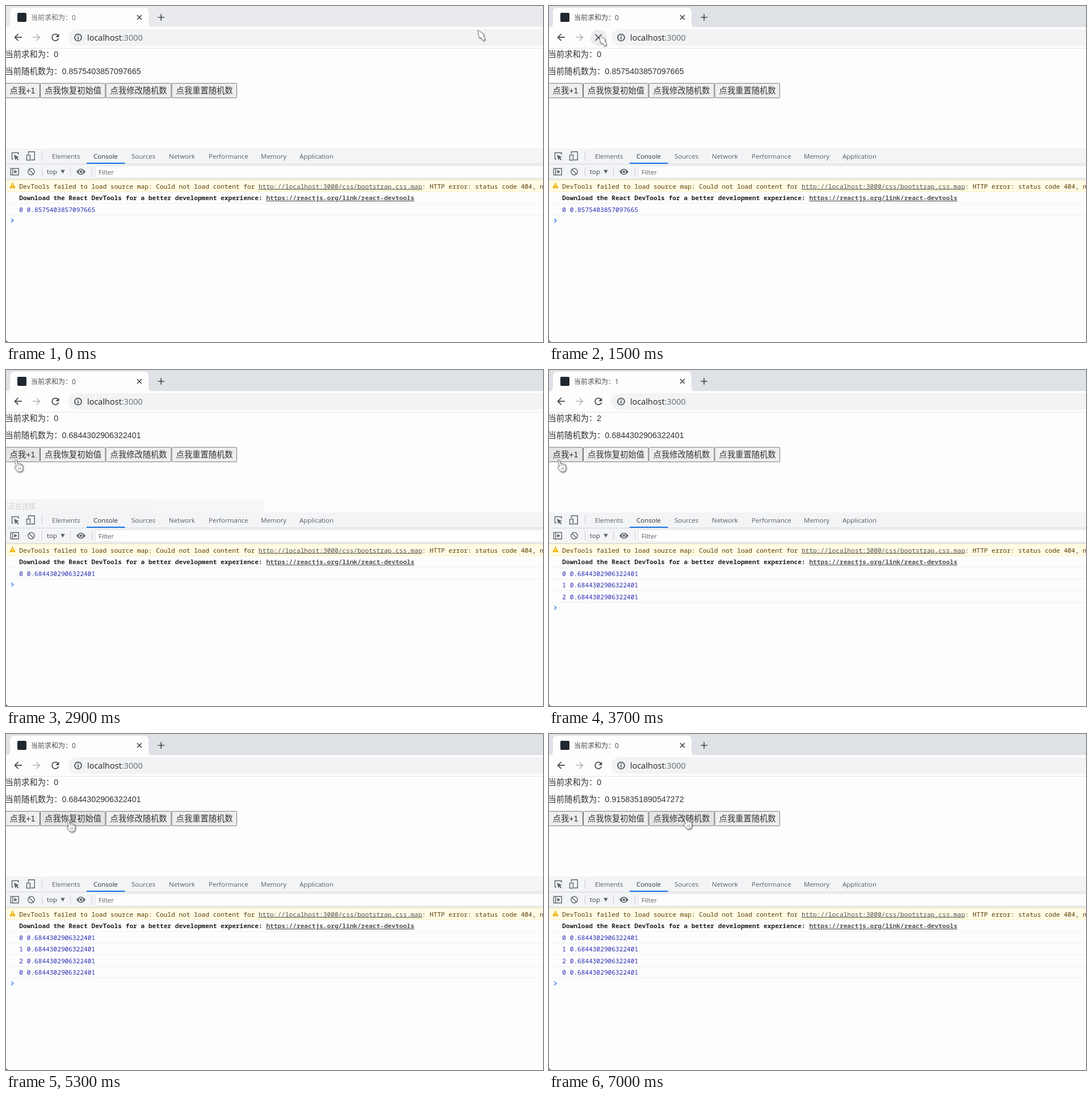
Recreate the animation shown at these times as an HTML page. Size 946x592 px, loop 8 s.

```html
<!DOCTYPE html>
<html lang="zh-CN">
<head>
<meta charset="utf-8">
<title>Counter demo</title>
<style>
  html, body { margin: 0; width: 100%; height: 100%; overflow: hidden; background: #fdfdfd; }
  svg { display: block; width: 100vw; height: 100vh; }
  text { white-space: pre; }
  .page { font: 14.3px "Liberation Sans", "Noto Sans CJK SC", "Noto Sans CJK", sans-serif; fill: #333; }
  .ui { font: 11.5px "Open Sans", "Noto Sans CJK SC", "Noto Sans CJK", sans-serif; fill: #5a5e62; }
  .small { font-size: 12px; }
  .mono { font: 11.16px "Noto Sans Mono", "DejaVu Sans Mono", monospace; }
  .link { text-decoration: underline; fill: #545454; }
  .line { fill: none; stroke: #5f6368; stroke-width: 1.4; }
  .dark { fill: none; stroke: #45494d; stroke-width: 1.7; }
  .rule { stroke: #f0f0f0; }
</style>
</head>
<body>
<svg viewBox="0 0 946 592" xmlns="http://www.w3.org/2000/svg">
  <defs>
    <filter id="shadow" x="-50%" y="-50%" width="220%" height="220%">
      <feDropShadow dx="1" dy="1.5" stdDeviation="1.1" flood-color="#000" flood-opacity=".45"/>
    </filter>
  </defs>
  <rect width="946" height="592" fill="#fdfdfd"/>

  <!-- tab strip -->
  <rect id="strip" width="946" height="38"/>
  <path d="M0 38Q7 38 7 30V11Q7 3 15 3H243Q251 3 251 11V30Q251 38 259 38Z" fill="#fdfdfd"/>
  <rect id="icon" x="20" y="12" width="16" height="16" rx="2" fill="#20282f"/>
  <g id="busy">
    <circle cx="28" cy="20" r="5" fill="#20282f"/>
    <path id="spin" d="M28 27A7 7 0 0 0 34 23.5" fill="none" stroke="#2f7de1" stroke-width="1.6"/>
  </g>
  <text id="title" class="ui small" x="44" y="24.6"></text>
  <path class="dark" d="M231 16L239 24M239 16L231 24"/>
  <path class="dark" d="M267.5 20H279M273.2 14.2V25.8"/>

  <!-- toolbar -->
  <rect y="37" width="946" height="37" fill="#fdfdfd"/>
  <path d="M0 74.5H946" stroke="#e0e2e4"/>
  <path d="M946 41H124A14.5 14.5 0 0 0 124 70H946Z" fill="#f1f3f4"/>
  <path class="dark" d="M28 55.2H15.5M21.5 49.2L15.5 55.2L21.5 61.2"/>
  <path class="dark" style="stroke:#b9bbbe" d="M47 55.2H59.5M53.5 49.2L59.5 55.2L53.5 61.2"/>
  <circle id="halo" cx="87.3" cy="56" r="14.5" fill="#ececee"/>
  <g id="reload">
    <path class="dark" d="M91.7 52A5.8 5.8 0 1 0 92.5 57"/>
    <path d="M93.4 49V55H87.4Z" fill="#45494d"/>
  </g>
  <path id="stop" class="dark" d="M81.5 50L92.5 61M92.5 50L81.5 61"/>
  <circle class="dark" cx="127" cy="55.5" r="6"/>
  <path class="dark" d="M127 54.7V59M127 51.8V53.4"/>
  <text class="ui" x="143" y="60.8" style="font-size:14.5px;fill:#202124">localhost<tspan fill="#686c70">:3000</tspan></text>

  <!-- page -->
  <text id="sum" class="page" x="-1.5" y="89.6"></text>
  <text id="rand" class="page" x="-1.5" y="120.4"></text>
  <g id="buttons"></g>
  <g id="status">
    <path d="M0 227.5H452Q455.5 227.5 455.5 231V251H0Z" fill="#dee1e6"/>
    <text class="ui small" x="4" y="244.5" style="fill:#44484c">正在连接...</text>
  </g>

  <!-- developer tools -->
  <rect y="251" width="946" height="55" fill="#f2f4f6"/>
  <path d="M0 278.5H946M0 305.5H946" stroke="#d3d6da"/>
  <g id="tabs"></g>
  <rect x="142" y="276" width="67.5" height="2" fill="#1a73e8"/>
  <path d="M63.5 256V272M63.5 284V300M113.5 284V300M151.5 284V300" stroke="#cccfd3"/>
  <path class="line" d="M13 269.5H10.5V258.5H22V262"/>
  <path d="M14 262L23 266.2L19.3 267.4L22.4 270.6L21 272L17.9 268.8L16.5 272Z" fill="#5f6368"/>
  <path class="line" d="M39.5 261V256.8H50.3V271.2H44"/>
  <rect class="line" x="36.5" y="262.6" width="6" height="9"/>
  <rect class="line" x="8.3" y="286.3" width="14" height="11.4"/>
  <path class="line" d="M11.7 286V298"/>
  <path d="M14.5 288.8L20 292L14.5 295.2Z" fill="#5f6368"/>
  <circle class="line" cx="44.5" cy="292" r="5.7"/>
  <path class="line" d="M40.5 288L48.5 296"/>
  <text class="ui" x="72" y="296.4" style="fill:#404448">top</text>
  <path d="M96.3 288.8H103.7L100 295.2Z" fill="#5f6368"/>
  <path d="M124 292Q132 281.5 140 292Q132 302.5 124 292Z" fill="#5f6368"/>
  <circle cx="132" cy="292" r="2.9" fill="#5f6368" stroke="#f2f4f6" stroke-width="1.5"/>
  <rect x="157.5" y="281.5" width="800" height="21" fill="#fdfdfd" stroke="#dfe1e4"/>
  <text class="ui" x="163" y="296.8">Filter</text>

  <!-- console -->
  <rect y="306" width="946" height="21" fill="#fffbe5"/>
  <path d="M0 306.5H946M0 327.3H946" stroke="#fbefba"/>
  <path d="M11.5 311.5L16.2 320.5H6.8Z" fill="#f0b400" stroke="#f0b400" stroke-linejoin="round"/>
  <path d="M11.5 314V317.4M11.5 318.4V319.7" stroke="#fff" stroke-width="1.3"/>
  <text class="mono" x="23.3" y="321.6" fill="#5c3c00">DevTools failed to load source map: Could not load content for <tspan class="link">http://localhost:3000/css/bootstrap.css.map</tspan>: HTTP error: status code 404, ne</text>
  <g id="logs"></g>
  <g id="prompt">
    <path d="M9.4 -3.2L12.8 0L9.4 3.2" fill="none" stroke="#367cf1" stroke-width="1.5"/>
    <path id="caret" d="M24.5 -7V7.5" stroke="#222" stroke-width="1.2"/>
  </g>
  <path d="M0 587Q.6 591.4 5 592H0Z" fill="#777"/>

  <!-- pointer -->
  <g id="pointer" filter="url(#shadow)" fill="#fafafa" stroke="#777" stroke-linejoin="round">
    <path id="arrow" d="M0 0L11 7L10 10.5L13.2 15.5L9.6 18.6L6.3 13.6L2.2 12.8Z"/>
    <g id="hand">
      <path d="M.6 2Q1 -.5 3.2 .8L6 7.6Q8 6 9.4 7.4Q11 6.2 12.2 8Q14 7.6 14.4 10L15 15Q15 20 11 21Q6 22 3.5 18.5L.2 13.5Q0 11.4 2.4 12.2L3.6 12.6Z"/>
      <path fill="none" stroke-width=".9" d="M6 7.6L7.2 11M9.4 7.6L10.2 11M12.2 8.2L12.8 11M7 14L8 18M10 13.6L10.6 17.6"/>
    </g>
  </g>
</svg>
<script>
const LOOP = 8000, ROW = 20.5;
const $ = id => document.getElementById(id);
const show = (id, on) => $(id).style.display = on ? '' : 'none';
const within = (t, a, b) => t >= a && t < b;

// Latest value whose time has come, from [time, value] pairs.
const at = (list, t) => list.filter(e => e[0] <= t).pop()[1];

const sums = [[0, 0], [3300, 1], [3600, 2], [4700, 0]];
const titles = [[0, 0], [3500, 1], [3900, 2], [4800, 0]];
const rands = [[0, '0.8575403857097665'], [2400, '0.6844302906322401'], [7000, '0.9158351890547272']];

// Pointer stops: time, x, y
const stops = [
  [0, 831, 42.5], [900, 88.5, 52], [2500, 88.5, 52], [2700, 70, 60], [2900, 15, 158],
  [3900, 15, 158], [4300, 105, 150], [5000, 105, 150], [5100, 107, 151],
  [6400, 107, 151], [6800, 237, 146]
];

const buttons = [
  { label: '点我+1', x: -1, w: 60.5, presses: [[3200, 3300], [3500, 3600]] },
  { label: '点我恢复初始值', x: 60.5, w: 114.5, presses: [[4600, 4700], [5200, 5300], [5500, 5600], [5900, 6300]] },
  { label: '点我修改随机数', x: 176, w: 115, presses: [[6900, 7000]] },
  { label: '点我重置随机数', x: 292, w: 114.5, presses: [] }
];

$('buttons').innerHTML = buttons.map(b =>
  `<rect x="${b.x}" y="136.2" width="${b.w}" height="25.6" rx="1.5" stroke="#767676"/>
   <text class="page" x="${b.x + 7.6}" y="153.6">${b.label}</text>`).join('');
const faces = $('buttons').querySelectorAll('rect');

$('tabs').innerHTML = [['Elements', 81], ['Console', 154], ['Sources', 221], ['Network', 287],
  ['Performance', 357], ['Memory', 449], ['Application', 517]].map(([name, x]) =>
  `<text class="ui" x="${x}" y="268.8"${name === 'Console' ? ' style="fill:#2c3034"' : ''}>${name}</text>`).join('');

const hint = '<tspan font-weight="700" fill="#222">Download the React DevTools for a better development experience: ' +
  '<tspan class="link">https://reactjs.org/link/react-devtools</tspan></tspan>';

function consoleRows(t) {
  if (within(t, 2000, 2400)) return [];
  const rand = at(rands, Math.min(t, 6900));
  return [hint, ...sums.filter(e => e[0] <= t).map(e => `${e[1]} ${rand}`)];
}

function pointerAt(t) {
  const i = stops.findIndex(s => s[0] > t);
  if (i < 0) return stops[stops.length - 1].slice(1);
  const [a, b] = [stops[i - 1], stops[i]];
  const p = (t - a[0]) / (b[0] - a[0]), e = p * p * (3 - 2 * p);
  return [a[1] + (b[1] - a[1]) * e, a[2] + (b[2] - a[2]) * e];
}

let lastRows = '';
function draw(t) {
  const active = t >= 1000;
  $('strip').setAttribute('fill', active ? '#dee1e6' : '#e8eaed');
  $('title').style.fill = active ? '#4a4e52' : '#686c70';
  $('title').textContent = '当前求和为：' + at(titles, t);
  $('sum').textContent = '当前求和为：' + at(sums, t);
  $('rand').textContent = '当前随机数为：' + at(rands, t);

  const loading = within(t, 1400, 2500), spinning = within(t, 1700, 2400);
  show('reload', !loading);
  show('stop', loading);
  show('halo', within(t, 1000, 2600));
  show('icon', !spinning);
  show('busy', spinning);
  $('spin').setAttribute('transform', `rotate(${(t - 2100) * 0.36} 28 20)`);
  $('status').style.opacity = at([[0, 0], [1700, 1], [2800, 0.6], [2900, 0.25], [3000, 0]], t);

  const [x, y] = pointerAt(t);
  const hovered = y > 130 ? buttons.findIndex(b => within(x + 2, b.x, b.x + b.w + 1)) : -1;
  buttons.forEach((b, i) => {
    const pressed = b.presses.some(p => within(t, ...p));
    faces[i].setAttribute('fill', pressed ? '#f5f5f5' : i === hovered ? '#e5e5e5' : '#efefef');
  });
  $('pointer').setAttribute('transform', `translate(${x} ${y})`);
  show('arrow', hovered < 0);
  show('hand', hovered >= 0);

  const rows = consoleRows(t);
  const html = rows.map((r, i) =>
    `<text class="mono" x="23.3" y="${342 + ROW * i}" fill="#2a2ab4">${r}</text>
     <path class="rule" d="M0 ${347.8 + ROW * i}H946"/>`).join('');
  if (html !== lastRows) $('logs').innerHTML = lastRows = html;
  $('prompt').setAttribute('transform', `translate(0 ${337 + ROW * rows.length})`);
  show('caret', within(t, 1000, 1500));
}

const start = performance.now();
function tick() {
  const t = (performance.now() - start) % LOOP;
  draw(Math.floor(t / 100) * 100);
  requestAnimationFrame(tick);
}
tick();
</script>
</body>
</html>
```
